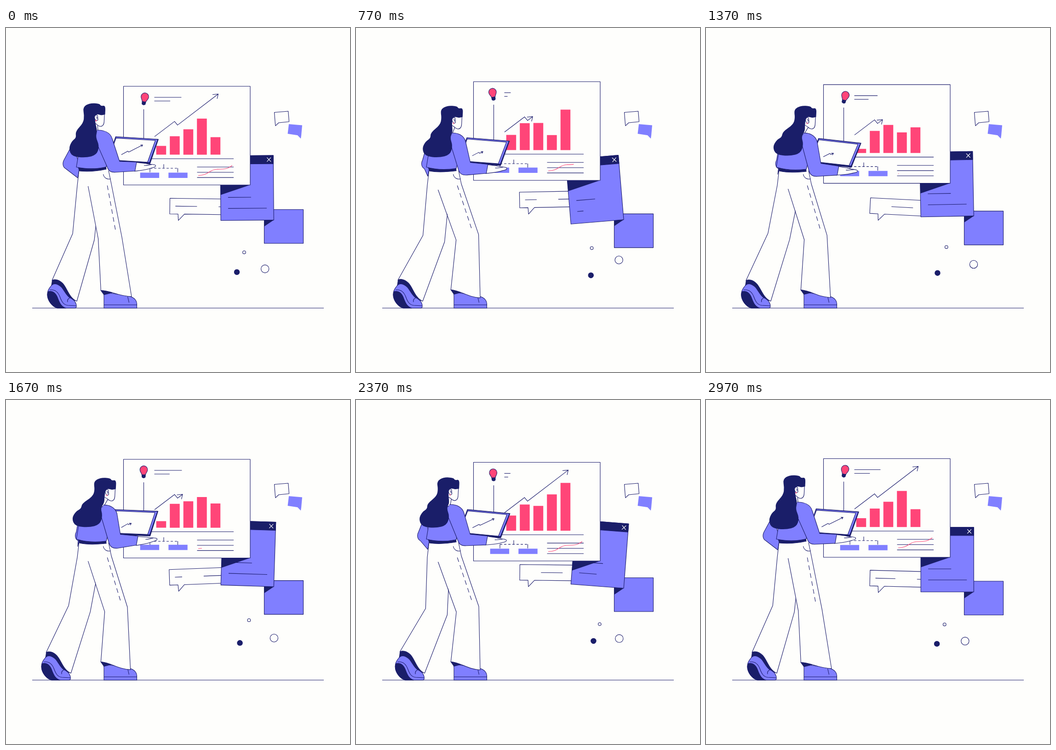
Recreate the animation shown at these times as an HTML page with a canvas. Size 748 by 748 pixels, loop 3.01 s.

```html
<!DOCTYPE html>
<html lang="en">
<head>
<meta charset="utf-8">
<title>Walking presenter</title>
<style>
html, body { margin: 0; width: 100%; height: 100%; overflow: hidden; background: #fefefc; }
canvas { display: block; width: 748px; height: 748px; }
</style>
</head>
<body>
<canvas id="stage" width="748" height="748"></canvas>
<script>
const ctx = document.getElementById('stage').getContext('2d');
const LOOP = 3010, HALF = LOOP / 2, RAD = Math.PI / 180;
const PAPER = '#fefefc', INK = '#1b1c6c', NAVY = '#1a1e69', LILAC = '#807fff', PINK = '#ff4578';
let t = 0;
// Shared channels of the figure: forward lean, knee bend, arm sway, settling.
let lean, bend, sway, settle, drawn;

// Cosine that runs n times per loop and peaks at the given phase in degrees.
const wave = (peak, n = 1) => Math.cos((n * 360 * t / LOOP - peak) * RAD);

// Periodic monotone cubic through a few [time, value] points.
function ease(pts, period = LOOP) {
  const n = pts.length, u = t % period;
  const at = j => {
    const k = Math.floor(j / n), p = pts[j - k * n];
    return [p[0] + k * period, p[1]];
  };
  const slope = j => {
    const a = at(j - 1), b = at(j), c = at(j + 1);
    const l = (b[1] - a[1]) / (b[0] - a[0]), r = (c[1] - b[1]) / (c[0] - b[0]);
    if (l * r <= 0) return 0;
    const m = (c[1] - a[1]) / (c[0] - a[0]);
    return Math.sign(m) * Math.min(Math.abs(m), 3 * Math.abs(l), 3 * Math.abs(r));
  };
  let i = n - 1;
  while (i >= 0 && pts[i][0] > u) i--;
  const a = at(i), b = at(i + 1), h = b[0] - a[0], s = (u - a[0]) / h;
  const s2 = s * s, s3 = s2 * s;
  return a[1] * (2 * s3 - 3 * s2 + 1) + b[1] * (3 * s2 - 2 * s3)
    + slope(i) * h * (s3 - 2 * s2 + s) + slope(i + 1) * h * (s3 - s2);
}

function draw(d, fill, stroke = INK, width = 1.1) {
  const p = new Path2D(d);
  if (fill) { ctx.fillStyle = fill; ctx.fill(p); }
  if (stroke) { ctx.strokeStyle = stroke; ctx.lineWidth = width; ctx.stroke(p); }
}
const line = (x1, y1, x2, y2) => draw(`M${x1},${y1}L${x2},${y2}`);
const box = (x, y, w, h, fill, stroke) => draw(`M${x},${y}h${w}v${h}h${-w}Z`, fill, stroke);

function dot(x, y, r, fill, stroke = INK) {
  draw(`M${x - r},${y}a${r},${r} 0 1 1 ${2 * r},0a${r},${r} 0 1 1 ${-2 * r},0Z`, fill, stroke);
}
function dashes(pattern, offset, ...seg) {
  ctx.setLineDash(pattern);
  ctx.lineDashOffset = offset;
  line(...seg);
  ctx.setLineDash([]);
}
function placed(x, y, deg, fn) {
  ctx.save();
  ctx.translate(x, y);
  ctx.rotate(deg * RAD);
  fn();
  ctx.restore();
}
function clipBox(x, y, w, h) {
  ctx.beginPath();
  ctx.rect(x, y, w, h);
  ctx.clip();
}
// Closed soft outline; a repeated point makes a corner.
function blob(pts, fill) {
  const mid = (a, b) => [(a[0] + b[0]) / 2, (a[1] + b[1]) / 2];
  ctx.beginPath();
  ctx.moveTo(...mid(pts[pts.length - 1], pts[0]));
  pts.forEach((p, i) => ctx.quadraticCurveTo(...p, ...mid(p, pts[(i + 1) % pts.length])));
  ctx.fillStyle = fill;
  ctx.fill();
}

function circles() {
  dot(521.7 - 10 * wave(68), 482.5 + 6.5 * wave(325), 3.3, PAPER);
  dot(509 - 6 * wave(-20, 2) - 4 * wave(70), 530.7 + 7 * wave(90), 5.7, NAVY);
  dot(573 + 10 * wave(190), 515.5 - 7.5 * wave(120) + 4.5 * wave(0, 2), 8.6, PAPER);
}

function chatIcons() {
  const tilt = ease([[200, 0], [440, -10], [640, 0]], HALF);
  placed(595, 210, tilt, () => draw('M-11.5,-26.5L18.7,-29L20.5,-6.2L-2,-4L-9,2.7L-9.7,-3.5Z', PAPER));
  const wag = ease([[0, 0], [150, 11], [430, -11], [570, 0], [1970, 0], [2150, 11], [2360, 0]]);
  placed(640, 238, wag, () => draw('M-25,-29L4,-26.5L2,-4L1,2.5L-6,-4.8L-27.5,-8Z', LILAC, null));
}

function bubble() {
  const deg = -0.3 - 4.4 * wave(105, 2);
  placed(356 + 0.6 * deg, 363.6 + 6.6 * wave(0, 2), deg, () => {
    draw('M0,0H125V34H32L19,48L18,34H0Z', PAPER);
    dashes([47, 47], -t * 282 / LOOP, 12, 17, 122, 17);
  });
}

function panels(bottom) {
  const y = 412.5 + 10.7 * wave(59), deg = -0.1 - 4.7 * wave(86);
  const cornerX = 524.7 + 57.6 * Math.cos(deg * RAD), cornerY = y + 57.6 * Math.sin(deg * RAD);
  box(561.5, 395.2 + 8.9 * wave(93), 85, 73.5, LILAC);
  draw(`M561.5,${cornerY - 9}L${cornerX},${cornerY}L561.5,${cornerY + 14}Z`, NAVY, null);
  bubble();

  const upper = ease([[200, 50], [520, 0], [865, 50]], HALF);
  const lower = ease([[330, 84], [660, 0], [1100, 84]], HALF);
  placed(524.7, y, deg, () => {
    box(-57.6, -140.5, 115.2, 140.5, LILAC);
    box(-57.6, -140.5, 115.2, 18, NAVY);
    draw('M43.7,-136l8.6,9m0,-9l-8.6,9', null, '#fff', 1.2);
    line(-41.5, -50, upper - 41.5, -50);
    line(-41.5, -26, lower - 41.5, -26);
    clipBox(-57.6, -140.5, 115.2, 140.5);
    ctx.rotate(-deg * RAD);
    ctx.translate(-524.7, -y);
    draw(`M440,${bottom}H531L440,${bottom + 31}Z`, NAVY, null);
  });
}

function bars() {
  [
    [[0, 19], [800, 33], [1370, 9], [2370, 33]],
    [[0, 40], [600, 60], [1370, 48], [2170, 60]],
    [[0, 55], [1370, 61], [1970, 54]],
    [[150, 78], [950, 26], [2000, 79]],
    [[0, 38], [800, 88], [1560, 50], [2370, 104]]
  ].forEach((pts, i) => {
    const h = ease(pts);
    box(326.7 + 29.5 * i, 148.7 - h, 21.5, h, PINK, null);
  });
}

function board(top) {
  placed(0, top, 0, () => {
    box(255.5, 0, 275.5, 214.5, PAPER);
    line(322.5, 24, 322.5 + ease([[100, 61], [830, 13]], HALF), 24);
    line(322.5, 32, 322.5 + ease([[60, 35], [760, 7]], HALF), 32);
    draw('M299.5,50V157.5H495');
    placed(299.3, 38, 15 * wave(-48, 2), () => {
      draw('M-4,-4C-4,-8 -8.3,-10 -8.3,-15.5A8.3,8.3 0 0 1 8.3,-15.5C8.3,-10 4,-8 4,-4Z', PINK);
      draw('M-4.3,-5H4.3V0C4.3,1.5 2,3 0,3S-4.3,1.5 -4.3,0Z', NAVY, null);
    });
    bars();

    const tip = 384 + 77.5 * drawn * drawn;
    draw(`M323,109.5L366.5,76.5L373,84.5L${tip},${84.5 - (tip - 373) * 0.765}m-12.5,1.2l12.5,-1.2l-2.5,10.5`);

    const hop = 4.5 * Math.max(0, wave(105, 2));
    line(343, 169.5, 343, 178);
    dashes([5, 4], 0, 313, 178.3, 373.5, 178.3);
    for (const x of [313, 373.5]) {
      line(x, 178, x, 187);
      box(x < 343 ? 291.7 : 353.3, 187.7 - hop, 41.4, 11.5, LILAC, null);
    }

    for (let i = 0; i < 3; i++) line(415.5, 175.6 + 11.4 * i, 495, 175.6 + 11.4 * i);
    clipBox(417, 160, ease([[430, 75], [1480, 0], [2370, 75]]), 50);
    draw('M418,194C440,194 442,181 458,180.5C476,180 482,180 492,172', null, PINK);
  });
}

function rearLeg() {
  const dx = -13.2 * lean, dy = 2 * (lean - bend);
  const shift = 8.5 * bend - 16.5 * lean * lean;
  const kx = 145 + shift, ky = 447 + 7 * bend - 6 * lean * lean;
  const hem = `L${100 + dx},${549 + dy}c5,-4 15,-2 23,6c10,10 14,${32 - dy} 31,${39 - dy}`;

  draw(`M${98 + dx},562${hem}L${136 + dx},591L${104 + dx},575Z`, NAVY, null);
  placed(dx, 0, 0, () => {
    draw('M97,562C104,552 114,557 121,564C128,573 131,581 138,586C145,589 151,593 153,602V606Q153,609 149,609H112C100,605 90,592 90,579C90,570 94,566 97,562Z', LILAC);
    draw('M92,573C101,571 108,576 112,586C116,597 120,606 130,609H112C100,606 90,592 90,580Q90,576 92,573Z', NAVY);
    draw('M95,569.5C106,568 113,574 117,584C121,595 125,602 134,603L152.5,604M140,586C135,588 133,592 134,596');
  });
  draw(`M159,308L155,342L${kx},${ky}${hem}L${kx + 47},${ky + 14}L204,350`, PAPER);
}

function frontLeg() {
  const kneeX = 252 + 15 * bend, cuff = 570.5 - 1.5 * bend;
  draw('M213,609V582L212,574L262,582C276,584 284,590 284.5,600V609Z', LILAC);
  draw('M213,602H284.5M264.5,584L267.5,597');
  draw(`M206,${cuff}C217,${cuff} 222,${cuff + 3} 232,${cuff + 5}L213,${580 - bend}Z`, NAVY);
  const edge = `L${200.5 + 17.7 * bend},${458 + 3 * bend}L206.3,${cuff}C230,${571 + bend} 242,${583 + 2 * bend} `
    + `${273 - 3 * bend},${584 + 3 * bend}L${kneeX},${455 - 6 * bend}L229,339L223,310`;
  draw(`M178,344${edge}L217,302L160,308L162,344Z`, PAPER, null);
  draw(`M178.5,${344 + 8 * bend}${edge}`);
  draw('M211.5,318C213,326 220,330 227.5,328');
  dashes([10, 7.5], 0, 220.3, 342.5, kneeX - 13.7, 441);
}

function tablet() {
  placed(238.5 - 6 * sway + 3 * lean, 236.3 - 1.5 * sway + 3 * lean, 3.5 - 3.5 * sway + lean, () => {
    draw('M0,0H93L78,54.5H-15Z', NAVY);
    draw('M1,1H91L76.5,51H-14Z', LILAC, null);
    draw('M1,3H86.5L72.5,51.2H-13Z', PAPER);
    const x = 36 + 23.7 * drawn;
    draw(`M14.7,38.4L28.3,29.8L30.4,31.7L${x},${31.7 - (x - 30.4) * 0.59}m-5,0.3l5,-0.3l-2,4.3`);
  });
}

function hair(hx, hy, tx, ty) {
  // Crown follows the head, ends follow the swing.
  const pts = [
    [215.5, 188], [215.5, 188], [207, 190], [199, 187], [193, 191], [194, 207], [198, 222], [194, 236],
    [202, 254], [196, 274], [172, 280], [142, 277], [135, 260], [142, 244], [152, 237], [150, 224],
    [168, 206], [170, 190], [167, 172], [182, 163], [204, 164.5], [206, 170], [216.5, 168]
  ];
  blob(pts.map(([x, y]) => {
    const s = Math.min(1, Math.max(0, (y - 185) / 75)), k = s * s * (3 - 2 * s);
    return [x + hx + (tx - hx) * k, y + hy + (ty - hy) * k];
  }), NAVY);
}

function person() {
  const hx = 24 * lean, hy = 5.6 * settle;
  const tx = 5.2 - 5 * wave(323), ty = 3 * wave(45);
  const cx = 14 * lean, cy = 6.5 * settle, sx = 0.75 * cx, sy = 0.85 * cy;
  const wx = 4 * lean - 1.5 * sway, wy = 7 * lean - 3.5 * sway;
  const ex = 4 * lean, ey = 9 * lean;

  // Far arm.
  const elbow = 124 + 27.5 * lean;
  draw(`M${elbow * 0.5 + 84},250L${elbow + 2},287C${elbow - 2},295 ${elbow},303 ${elbow + 6},306L156,${326 - 8 * lean * lean}L160,302Z`, LILAC);
  rearLeg();
  frontLeg();

  // Belt, shirt and neck.
  const dip = 2.5 * lean;
  draw(`M157,303L160,311C180,${313 + dip} 200,${311 + dip} 218,${307 + 2 * dip}L217,301Z`, NAVY);
  draw(`M${198 + cx},${222 + cy}C${180 + cx},${226 + cy} 160,245 158,272L153,302.5C175,${307 + dip} 198,${307 + dip} 218,${302 + 2 * dip}L${224 + sx},${240 + sy}Z`, LILAC);
  draw(`M${190 + hx},${203 + hy}L${199 + hx},${209 + hy}L${200 + cx},${223 + cy}L${190 + cx},${229 + cy}Z`, PAPER);
  tablet();

  placed(284 + wx, 291.5 + wy, lean - 5 * sway, () => {
    draw('M-4,0C6,2 14,2 20,3C28,6 38,4 41,7C43,10 37,12 32,13C22,17 10,18 -5,20Z', PAPER);
    draw('M16,7.5C22,8 28,6 33,5.5');
  });

  // Near arm.
  draw(`M${198 + cx},${222 + cy}C${213 + sx},${222 + sy} ${227 + sx},${227 + sy} ${231 + sx},${241 + sy}`
    + `L${247 + wx * 0.6},${290 + wy * 0.5}L${284 + wx},${291.5 + wy}L${280.5 + wx},${311 + wy}L${239 + ex},${313.5 + ey}`
    + `C${228 + ex},${314.5 + ey} ${223 + ex},${311 + ey} ${220 + ex},${302 + ey}L${198.5 + tx},${254 + ty}`, LILAC);

  placed(hx, hy, 0, () => draw('M190,180H214.5L213.3,204C213,211 209,215 204,213.7Q200,213 197.5,209.5L190,205Z', PAPER));
  hair(hx, hy, tx, ty);
  placed(hx, hy, 0, () => {
    draw('M199,190C194,187 191,193 193.5,198C195,202 199,203 200,199Z', PAPER);
    draw('M195.5,193Q199,193 197.5,198');
    dot(195.7, 201.5, 1.4, PINK, null);
  });
}

function frame(now) {
  t = now % LOOP;
  lean = ease([[0, 0], [430, 0.06], [770, 0.68], [1370, 1], [1970, 0.85], [2370, 0.36]]);
  bend = ease([[0, 0], [430, 0.57], [770, 0.97], [1370, 0.74], [2370, 1]]);
  sway = wave(90, 2);
  settle = 1 - (1 - lean) ** 4;
  drawn = ease([[0, 1], [900, 0], [1650, 0], [2370, 1]]);

  ctx.fillStyle = PAPER;
  ctx.fillRect(0, 0, 748, 748);
  ctx.lineJoin = 'round';
  line(57, 609, 691, 609);
  const top = 126.2 - 9.5 * wave(93);
  circles();
  chatIcons();
  panels(top + 214.5);
  board(top);
  person();
  requestAnimationFrame(frame);
}
requestAnimationFrame(frame);
</script>
</body>
</html>
```
